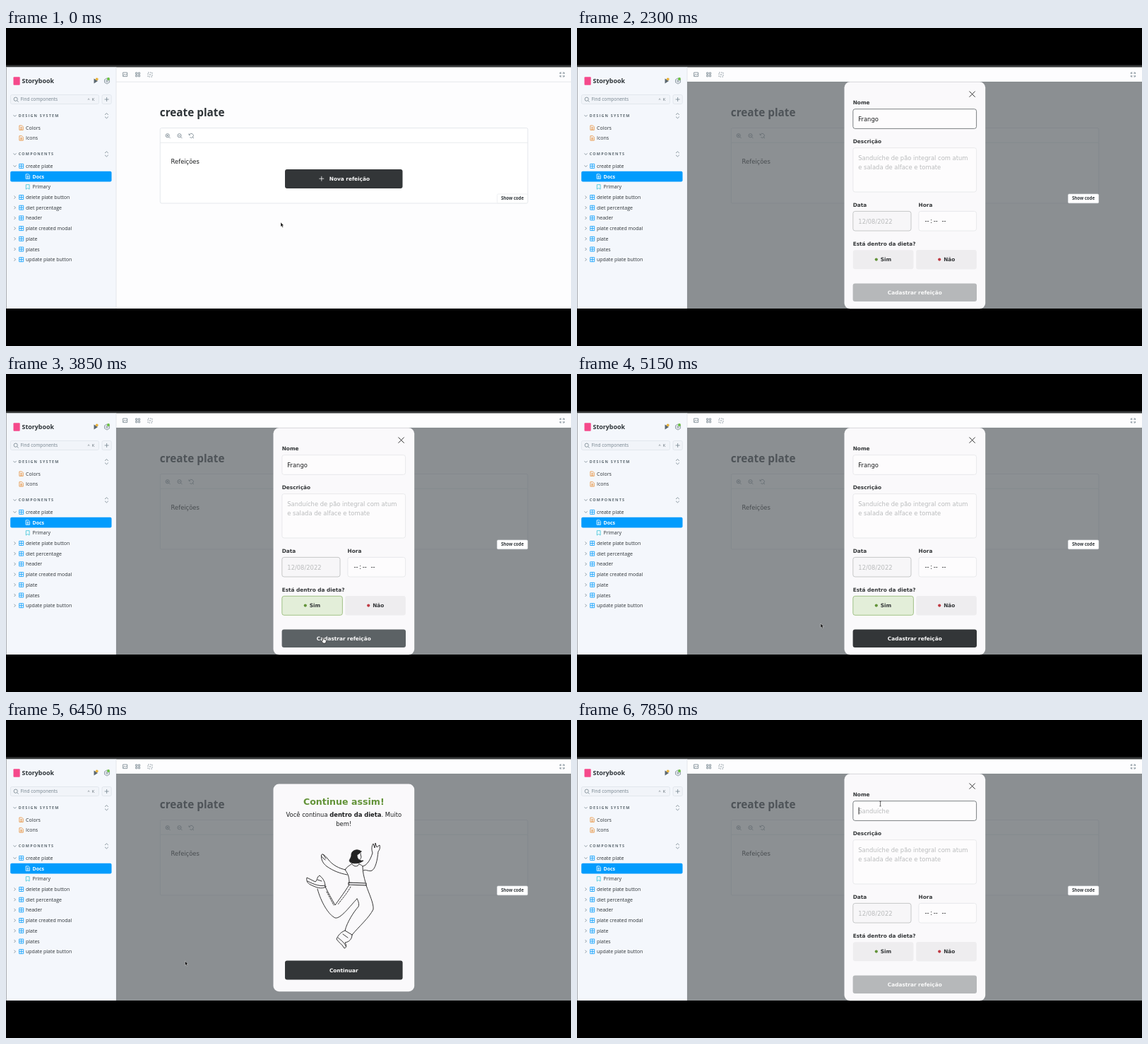
An HTML page for the animation above (8000 ms loop, 800 px wide and 450 px high).

```html
<!DOCTYPE html>
<html lang="pt">
<head>
<meta charset="utf-8">
<title>create plate</title>
<style>
  html, body { margin: 0; width: 100%; height: 100%; overflow: hidden; background: #000; }
  svg { display: block; width: 800px; height: 450px; }
  text { white-space: pre; }
  .ui { font: 7px "Open Sans", sans-serif; fill: #2e3438; }
  .app { font: 8.4px "DejaVu Sans", sans-serif; fill: #1b1d1e; }
  .b { font-weight: 700; }
  .app .b { font-size: 7.35px; fill: #333638; }
  .app .light { fill: #fafafa; }
  .hint { fill: #b9bbbc; }
  .mid { text-anchor: middle; }
  .cap { font-size: 5.4px; font-weight: 700; letter-spacing: 1.22px; fill: #5c6870; }
  .line { fill: none; stroke: #73828c; stroke-width: .8; }
  .field { fill: #fdfcfd; stroke: #e4e5e8; stroke-width: .8; }
  .ink { fill: none; stroke: #222; stroke-width: .9; stroke-linecap: round; stroke-linejoin: round; }
</style>
</head>
<body>
<svg viewBox="0 0 800 450">
  <defs>
    <path id="chevron" d="M-1 -2 1 0 -1 2"/>
    <path id="grid" d="M-3 -3H3V3H-3ZM0 -3V3M-3 0H3"/>
    <path id="doc" d="M-2.6 -3.2H1L2.8 -1.4V3.2H-2.6ZM-1.2 -.6H1.4M-1.2 .8H1.4M-1.2 2H1.4"/>
    <path id="bookmark" d="M-2.4 -3.2H2.4V3.2L0 1.6 -2.4 3.2Z"/>
    <path id="updown" d="M-2.4 -1.4 0 -3.6 2.4 -1.4M-2.4 1.4 0 3.6 2.4 1.4"/>
    <path id="lens" d="M1.7 1.7 3.6 3.6M2.3 -.3A2.6 2.6 0 1 1 -2.9 -.3 2.6 2.6 0 1 1 2.3 -.3"/>
  </defs>

  <rect width="800" height="450"/>
  <rect y="52.5" width="800" height="4" fill="#363839"/>
  <rect y="55.5" width="800" height="341.5" fill="#fdfdfe"/>

  <g class="ui">
    <rect y="55.5" width="156" height="341.5" fill="#f4f7fc"/>
    <path d="M.4 55.5V397" stroke="#8c9196" stroke-width=".8"/>
    <path d="M156 55.5V397M156 76.2H800" class="line" style="stroke:#dfe3e8"/>
    <rect x="10.5" y="69.3" width="9.2" height="11.4" rx="1" fill="#f5498b"/>
    <text class="b" x="22.5" y="78.2" font-size="9" style="font-size:8.9px">Storybook</text>
    <path d="M124.5 71.5 130 75 124.5 78.5Z" fill="#5c6870"/>
    <circle cx="128.7" cy="72.3" r="1.9" fill="#e8b23c"/>
    <path class="line" d="M139.5 73 143 71 146.4 73V77L143 79 139.5 77Z"/>
    <circle class="line" cx="143" cy="75" r="1.4"/>
    <circle cx="145" cy="72" r="1.9" fill="#66bf3c"/>
    <g fill="#f1f4f9" stroke="#dbe1e9" stroke-width=".7">
      <rect x="6.4" y="94.5" width="125" height="13" rx="2"/>
      <rect x="136" y="94.5" width="13.2" height="13" rx="2"/>
    </g>
    <use href="#lens" class="line" x="14" y="101"/>
    <text x="20.5" y="103.4" fill="#73828c" style="font-size:6.5px">Find components</text>
    <text x="115.5" y="103.2" style="font-size:5.8px" fill="#5c6870">^  K</text>
    <path class="line" d="M139.6 101H145.6M142.6 98V104"/>
    <g id="sidebar"></g>

    <g class="line">
      <path d="M165.6 63H171.6V68.6H165.6ZM165.8 67.4 168 65.4 169.4 66.6 171.4 65"/>
      <path d="M183.6 63H185.8V65.2H183.6ZM187.4 63H189.6V65.2H187.4ZM183.6 66.6H185.8V68.8H183.6ZM187.4 66.6H189.6V68.8H187.4Z"/>
      <path d="M201 63H207V69H201Z" stroke-dasharray="1.7 1.3"/>
      <path d="M202.8 66H205.2"/>
      <path d="M784.4 65V63H786.4M788.4 63H790.4V65M790.4 67V69H788.4M786.4 69H784.4V67M784.6 63.2 786.4 65M790.2 63.2 788.4 65M790.2 68.8 788.4 67M784.6 68.8 786.4 67"/>
    </g>

    <text class="b" x="217.8" y="124.6" style="font-size:15.3px">create plate</text>
    <rect class="line" x="218.3" y="141.5" width="520.5" height="106.5" rx="2" style="stroke:#dfe3e7;fill:#fff"/>
    <path class="line" d="M218.3 162.3H738.8" style="stroke:#e3e6ea"/>
    <g class="line">
      <use href="#lens" x="229" y="152.5"/><path d="M227.4 152.2H230M228.7 150.9V153.5"/>
      <use href="#lens" x="245.8" y="152.5"/><path d="M244.2 152.2H246.8"/>
      <path d="M259.6 151A3 3 0 1 1 260.4 154.6M259 149.4V151.4H261M264 154.4 266 156"/>
    </g>
  </g>

  <g class="app">
    <text x="233.6" y="192.3">Refeições</text>
    <rect id="newButton" x="395" y="200" width="166.5" height="27" rx="3"/>
    <path d="M443.4 213.2H450.2M446.8 209.8V216.6" stroke="#fafafa" stroke-width=".8"/>
    <text class="b light" x="457.8" y="215.9">Nova refeição</text>
  </g>

  <rect id="overlay" x="156" y="76" width="644" height="321" fill="#5c6265" opacity=".7"/>
  <g class="ui">
    <rect x="695.4" y="235" width="43.2" height="12.8" rx="1.5" fill="#fff" stroke="#e3e6ea" stroke-width=".6"/>
    <text class="b mid" x="717" y="243.4" style="font-size:6.1px">Show code</text>
  </g>

  <g id="form" class="app">
    <rect x="378.5" y="76.3" width="199.7" height="321" rx="8" fill="#faf9fb"/>
    <path class="ink" d="M555.8 89.8 563.4 97.4M563.4 89.8 555.8 97.4"/>
    <text class="b" x="390.7" y="108">Nome</text>
    <rect id="nameField" class="field" x="390.8" y="114.7" width="174.8" height="27.7" rx="3"/>
    <text id="name" x="398.3" y="131.8"></text>
    <path id="caret" d="M399.1 123.5V133.5" stroke="#111" stroke-width=".9"/>
    <text class="b" x="390.7" y="163">Descrição</text>
    <rect class="field" x="390.8" y="169.6" width="174.8" height="62.4" rx="3"/>
    <text class="hint" x="398.3" y="187">Sanduíche de pão integral com atum</text>
    <text class="hint" x="398.3" y="199.5">e salada de alface e tomate</text>
    <text class="b" x="390.7" y="252.8">Data</text>
    <rect class="field" x="390.8" y="259.4" width="82.2" height="27.6" rx="3" style="fill:#f7f6f8;stroke:#b9bbbc"/>
    <text class="hint" x="398.3" y="276.5">12/08/2022</text>
    <text class="b" x="483.6" y="252.8">Hora</text>
    <rect class="field" x="483.8" y="259.4" width="81.8" height="27.6" rx="3"/>
    <text y="276.3"><tspan x="492.6">--</tspan><tspan x="500.2">:</tspan><tspan x="504.8">--</tspan><tspan x="516.4">--</tspan></text>
    <text class="b" x="390.7" y="307.6">Está dentro da dieta?</text>
    <rect id="yes" x="390.8" y="314.3" width="85.6" height="27" rx="3" stroke-width=".8"/>
    <circle cx="423.8" cy="327.6" r="2.1" fill="#639339"/>
    <text class="b" x="429.8" y="330.3">Sim</text>
    <rect x="480.2" y="314" width="85.6" height="27.4" rx="3" fill="#eeedef"/>
    <circle cx="513.2" cy="327.6" r="2.1" fill="#bf3b44"/>
    <text class="b" x="519.2" y="330.3">Não</text>
    <rect id="submit" x="390.6" y="361.4" width="175.4" height="25.6" rx="3"/>
    <text class="b light mid" x="478.3" y="377">Cadastrar refeição</text>
  </g>

  <g id="success" class="app">
    <rect x="378.5" y="90.6" width="199.7" height="293.6" rx="8" fill="#faf9fb"/>
    <text class="b mid" x="478.3" y="119.5" style="font-size:12.6px;fill:#639339">Continue assim!</text>
    <text class="mid" x="478.3" y="137.2">Você continua <tspan font-weight="700">dentro da dieta</tspan>. Muito</text>
    <text class="mid" x="478.3" y="149.7">bem!</text>
    <g class="ink">
      <path d="M481 212C471 210 462 205 456 197C453 193 448 188 446.500 191C446 198 449 203 454 207C464 214 473 217 483 219M446.500 193 452 198M449 190 453 196"/>
      <path d="M505 207C511 206 516 198 519 188C517 182 518 178 520 175L522 181 523 174 525 180 529 177C530 181 529 184 527 186C526 198 523 212 517 213.500C512 214 509 211 506 213"/>
      <path d="M490 203C487 206 483 207 480 212C485 218 486 224 486 230M498 201C500 205 504 205 505 207C505 216 507 222 509 230M490 204C493 208 498 208 500 204"/>
      <path d="M485 230 510 231V234L485 233Z" stroke-width="1.1"/>
      <path d="M486 233C478 246 470 256 466 262C461 253 456 244 452 236M441 239C446 258 457 276 466 280C474 282 488 262 497 253M510 234C514 246 521 260 520 268C514 280 500 292 490 304M497 253C500 258 500 262 499 264C492 272 483 286 480 298L490 304"/>
      <path d="M488 236C482 247 475 254 470 261M454 243 464 262" stroke-dasharray="2 1.5"/>
      <path d="M452 236C452 230 450 225 444 220C440 222 441 227 438 229L426 223C425 228 427 231 431 233C439 237 447 240 453 236ZM427 228C436 233 446 236 452 234M441 226 447 228"/>
      <path d="M480 298C474 300 470 305 468 310C470 314 476 317 479 323C483 322 482 318 480 315C486 314 490 310 490 304M470 308C475 312 480 316 481 320M477 303 484 308"/>
      <path d="M494 186C498 184 503 186 502 190L503 194C502 198 499 200 496 199" fill="#faf9fb"/>
      <path d="M503 186C497 181 488 185 489 192C488 197 484 199 488 201.500C493 204 501 203 506 199C500 200 497 196 497 191C499 190 501 188 503 186Z" fill="#222"/>
    </g>
    <rect x="395" y="340.4" width="166.6" height="27" rx="3" fill="#333638"/>
    <text class="b light mid" x="478.3" y="356.6">Continuar</text>
  </g>

  <g id="cursor" stroke-linejoin="round">
    <path id="arrow" d="M0 0V6.200L1.400 5 2.400 7.200 3.500 6.700 2.500 4.600H4.300Z" fill="#111" stroke="#fff" stroke-width=".4"/>
    <path id="beam" d="M-1.200 -3.400H1.200M-1.200 3.400H1.200M0 -3.400V3.400" fill="none" stroke="#333" stroke-width=".7"/>
    <path id="hand" d="M0 0Q1 -.8 1.500 .3V2.500L4.600 3.200Q5.300 4 4.400 6.800L3.800 8H.6L-1.900 4.800Q-1.700 3.500 0 4.600Z" fill="#fff" stroke="#222" stroke-width=".7"/>
  </g>
</svg>
<script>
const LOOP = 8000;
const DARK = '#333638', HOVER = '#5c6265';
const BLUE = '#029cfd', ORANGE = '#e8903a', TEAL = '#37c5d8';
const $ = id => document.getElementById(id);

// Sidebar
const icon = (name, x, y, color) =>
  `<use href="#${name}" x="${x}" y="${y}" class="line" style="stroke:${color}"/>`;
const label = (text, x, y, attrs = '') => `<text x="${x}" y="${y + 2.5}" ${attrs}>${text}</text>`;
const openChevron = y =>
  `<use href="#chevron" class="line" transform="translate(12.500 ${y}) rotate(90)"/>`;
const section = (text, y) => openChevron(y) +
  `<text class="cap" x="17.800" y="${y + 2}">${text}</text>` + icon('updown', 142.4, y, '#73828c');

const closed = ['delete plate button', 'diet percentage', 'header', 'plate created modal',
  'plate', 'plates', 'update plate button'];
$('sidebar').innerHTML =
  section('DESIGN SYSTEM', 124.2) + section('COMPONENTS', 178.4) +
  ['Colors', 'Icons'].map((name, i) => {
    const y = 141.2 + i * 14.7;
    return icon('doc', 21.5, y, ORANGE) + label(name, 28, y);
  }).join('') +
  openChevron(195.4) + icon('grid', 21.7, 195.4, BLUE) + label('create plate', 28, 195.4) +
  `<rect x="6.200" y="202.800" width="143.300" height="14.600" rx="2" fill="${BLUE}"/>` +
  icon('doc', 30.7, 210.1, '#fff') + label('Docs', 37.5, 210.1, 'class="b" fill="#fff"') +
  icon('bookmark', 30.7, 224.9, TEAL) + label('Primary', 37.5, 224.9) +
  closed.map((name, i) => {
    const y = 239.5 + i * 14.7;
    return icon('chevron', 12.5, y, '#73828c') + icon('grid', 21.7, y, BLUE) + label(name, 28, y);
  }).join('');

// Pointer path: time, x, y, shape from that time on
const path = [
  [0, 389, 275, 'arrow'], [50, 389, 275, 'arrow'], [250, 420, 216, 'hand'], [400, 424, 208, 'beam'],
  [650, 418.5, 110.5, 'beam'], [850, 428, 118, 'beam'], [1150, 429.5, 118.5, 'beam'],
  [2700, 429.5, 120, 'beam'], [2760, 431, 165, 'arrow'], [2950, 437, 345, 'arrow'],
  [3200, 437, 345, 'arrow'], [3250, 441, 334, 'hand'], [3430, 441, 334, 'hand'],
  [3500, 443, 345, 'arrow'], [3600, 447, 368, 'hand'], [3650, 448.5, 373, 'hand'],
  [4150, 448.5, 373, 'hand'], [4350, 472, 356, 'arrow'], [4700, 477, 354, 'arrow'],
  [5050, 380, 368, 'arrow'], [5500, 224, 301, 'arrow'], [5900, 225, 304, 'arrow'],
  [6350, 253.5, 341, 'arrow'], [6650, 253.5, 341, 'arrow'], [7000, 335, 152, 'arrow'],
  [7150, 335, 152, 'arrow'], [7200, 345.5, 141, 'arrow'], [7340, 410, 206, 'hand'],
  [7420, 412, 204, 'beam'], [7550, 429.5, 118.5, 'beam'], [LOOP, 429.5, 118.5, 'beam']
];
const keyTimes = [1350, 1800, 2000, 2100, 2200, 2300];
const within = (t, from, to) => t >= from && t < to;
const show = (id, on) => $(id).setAttribute('display', on ? 'inline' : 'none');
const fill = (id, color) => $(id).setAttribute('fill', color);

function drawCursor(t) {
  const i = path.findIndex(point => point[0] > t);
  const [t0, x0, y0, shape] = path[i - 1], [t1, x1, y1] = path[i];
  const k = (t - t0) / (t1 - t0);
  $('cursor').setAttribute('transform', `translate(${x0 + (x1 - x0) * k} ${y0 + (y1 - y0) * k})`);
  for (const id of ['arrow', 'beam', 'hand']) show(id, id === shape);
  show('cursor', !within(t, 1350, 2700));
}

function draw(t) {
  const form = within(t, 400, 5950) || t >= 7420;
  const success = within(t, 5950, 6650);
  show('form', form);
  show('success', success);
  show('overlay', form || success);
  fill('newButton', within(t, 250, 400) || within(t, 6650, 7420) ? HOVER : DARK);

  const focused = within(t, 950, 3400) || t >= 7700;
  const typed = t < 7420 ? 'Frango'.slice(0, keyTimes.filter(k => k <= t).length) : '';
  $('name').textContent = typed || 'Sanduíche';
  $('name').setAttribute('class', typed ? '' : 'hint');
  $('nameField').style.stroke = focused ? HOVER : '';
  show('caret', focused && !typed);

  const chosen = within(t, 3400, 5950);
  fill('yes', chosen ? '#e3eed9' : '#eeedef');
  $('yes').setAttribute('stroke', chosen ? '#8fb56f' : 'none');
  fill('submit', !chosen ? '#b6b8ba' : within(t, 3600, 4300) ? HOVER : DARK);
  drawCursor(t);
}

function tick() {
  draw(performance.now() % LOOP);
  requestAnimationFrame(tick);
}
tick();
</script>
</body>
</html>
```
